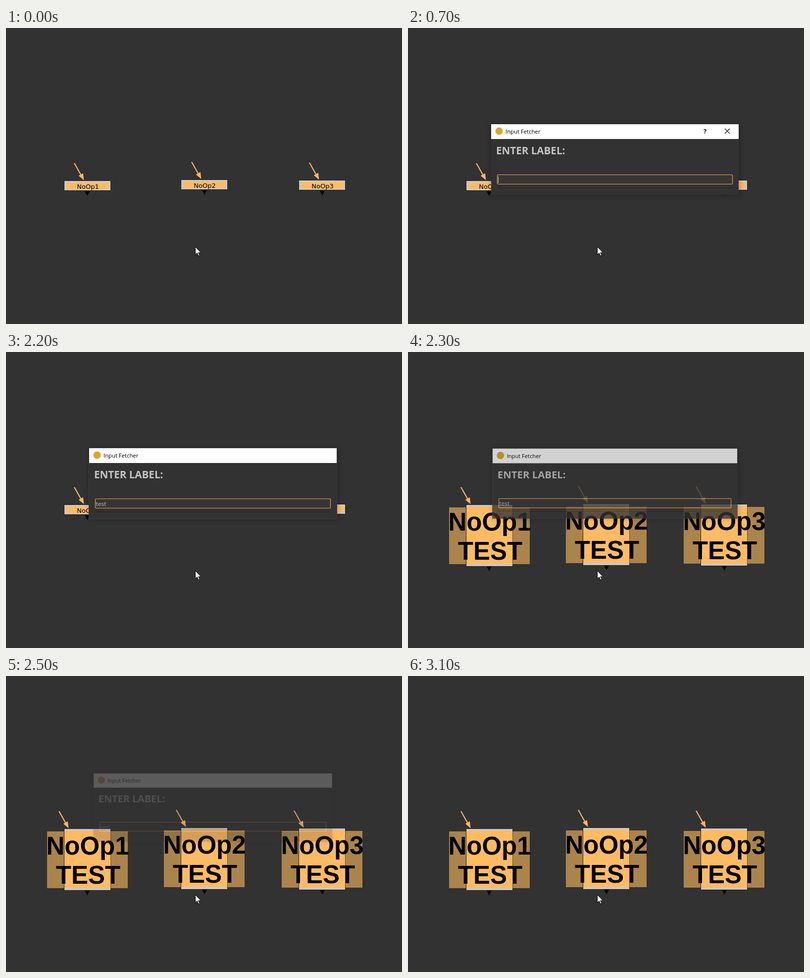
These frames come from a looping animation (800 by 600 pixels, 4300 ms). An HTML page:

```html
<!DOCTYPE html>
<html lang="en">
<head>
<meta charset="utf-8">
<title>Node labels</title>
<style>
  html, body { margin: 0; width: 100%; height: 100%; overflow: hidden; background: #323233; }
  svg { display: block; width: 100vw; height: 100vh; }
  text { white-space: pre; }
  .name { font: 13px "DejaVu Sans", sans-serif; text-anchor: middle; }
  .big { font: bold 51px "Liberation Sans", Arial, sans-serif; text-anchor: middle; }
  .title { font: 11.3px "Open Sans", sans-serif; }
  .help { font: bold 12px "Open Sans", sans-serif; text-anchor: middle; }
  .heading { font: bold 20.6px "Noto Sans", "Open Sans", sans-serif; fill: #c3c3c3; }
  .entry { font: 11px "DejaVu Sans", sans-serif; fill: #bdbdbd; }
</style>
</head>
<body>
<svg viewBox="0 0 800 600">
  <defs>
    <filter id="blur" x="-10%" y="-20%" width="120%" height="140%">
      <feGaussianBlur stdDeviation="5"/>
    </filter>
    <g id="arrow" fill="#fbb762">
      <path d="M138 274L151.500 298" stroke="#fbb762" stroke-width="2.200"/>
      <path d="M157.500 308.500L155.800 294.500L146.800 299.500Z"/>
    </g>
    <path id="output" d="M159 331H169L164 340.500Z" fill="#060606"/>
  </defs>

  <g id="plain"></g>
  <g id="labelled"></g>
  <rect id="dot" width="1" height="1"/>

  <g id="dialog">
    <rect x="166" y="194" width="506" height="147" opacity=".2" filter="url(#blur)"/>
    <rect x="168" y="195" width="500" height="143" fill="#323233"/>
    <rect id="frame" x="167.500" y="194.500" width="501" height="144" fill="none" stroke="#3d3d3d"/>
    <rect x="168" y="195" width="500" height="30" fill="#fff"/>
    <circle cx="184" cy="209" r="7.500" fill="#dca52f"/>
    <text class="title" x="197" y="214">Input Fetcher</text>
    <g id="buttons">
      <text class="help" x="600" y="214">?</text>
      <path d="M640 204L650 214M650 204L640 214" stroke="#111" stroke-width="1.100"/>
    </g>
    <text class="heading" x="178" y="256">ENTER LABEL:</text>
    <rect x="180.500" y="297.500" width="475" height="19" rx="1.500" fill="#363636" stroke="#f0a43c" stroke-width="1.200"/>
    <text class="entry" id="entry" x="181.500" y="312"></text>
    <path id="caret" d="M0 301V314" stroke="#c8c8c8"/>
    <path d="M180 324.500H657" stroke="#1c1c1c"/>
    <path d="M180 325.500H657" stroke="#3c3c3c"/>
  </g>

  <path d="M382.500 443.500V459.500L386.200 456L388.800 462L391.300 461L388.700 455.200H393.800Z" fill="#fff" stroke="#000" stroke-width="1"/>
</svg>
<script>
const LOOP = 4300;
const OPENED = 100, UNFOCUSED = 2200, LABELLED = 2300;
const byId = id => document.getElementById(id);

const nodes = [
  { name: "NoOp1", x: 0, y: 0, arrowX: 0, arrowY: 0 },
  { name: "NoOp2", x: 236, y: -2, arrowX: 1, arrowY: -.5 },
  { name: "NoOp3", x: 474, y: -1, arrowX: 1, arrowY: 0 }
];

// [start, opacity, scale]
const fades = [
  [0, 0, 1], [100, .2, .935], [200, .65, .975], [300, .92, .994], [400, 1, 1],
  [2300, .78, .988], [2400, .41, .973], [2500, .2, .963], [2600, .08, .956],
  [2700, .04, .953], [2800, .02, .951], [2900, .01, .95], [3000, 0, .95]
];

// [start, typed text, caret shown]
const typing = [
  [0, "", true], [1000, "", false], [1100, "t", true], [1200, "te", true],
  [1300, "tes", true], [1600, "test", true], [2100, "test", false]
];

const rect = (x, y, w, h, fill, extra = "") =>
  `<rect x="${x}" y="${y}" width="${w}" height="${h}" fill="${fill}" ${extra}/>`;

const frameBox = height =>
  rect(117, 309, 94.5, height + 1, "#1d1d1d") +
  rect(118, 310, 93, height - .5, "#c9c9c9");

const plainBody = name =>
  frameBox(19.5) + rect(121, 313, 87, 13.5, "#ffbb64") +
  `<text class="name" x="165.500" y="326">${name}</text>`;

const labelledBody = name =>
  rect(83, 315, 163, 115, "#ab844c") + frameBox(124.5) +
  rect(121, 313, 87, 117, "#ffbb64") + rect(118, 315, 93, 115, "#ffbb64") +
  `<text class="big" x="165" y="362">${name}</text>
   <text class="big" x="166" y="421">TEST</text>`;

const drawNodes = (body, arrowShift, outputShift) => nodes.map(n =>
  `<g transform="translate(${n.x} ${n.y})">
    ${body(n.name)}
    <use href="#arrow" x="${n.arrowX + arrowShift}" y="${n.arrowY}"/>
    <use href="#output" x="${n.arrowX}" y="${outputShift}"/>
  </g>`).join("");

byId("plain").innerHTML = drawNodes(plainBody, 0, 0);
byId("labelled").innerHTML = drawNodes(labelledBody, -31, 104);

const stepAt = (steps, t) => steps.findLast(step => step[0] <= t);
const show = (id, visible) => byId(id).setAttribute("visibility", visible ? "visible" : "hidden");

function render(t) {
  const [, opacity, scale] = stepAt(fades, t);
  const [, typed, caretOn] = stepAt(typing, t);

  show("plain", t < LABELLED);
  show("labelled", t >= LABELLED);
  show("dot", t >= OPENED);
  show("buttons", t < UNFOCUSED);
  show("frame", t >= UNFOCUSED);
  show("caret", caretOn);

  const dialog = byId("dialog");
  dialog.setAttribute("opacity", opacity);
  dialog.setAttribute("transform", `translate(417 266) scale(${scale}) translate(-417 -266)`);

  const entry = byId("entry");
  entry.textContent = typed;
  const caretX = typed ? Math.round(181.5 + entry.getComputedTextLength()) + .5 : 182.5;
  byId("caret").setAttribute("transform", `translate(${caretX} 0)`);
}

const start = performance.now();
function tick(now) {
  render(Math.max(0, now - start) % LOOP);
  requestAnimationFrame(tick);
}
render(0);
requestAnimationFrame(tick);
</script>
</body>
</html>
```
